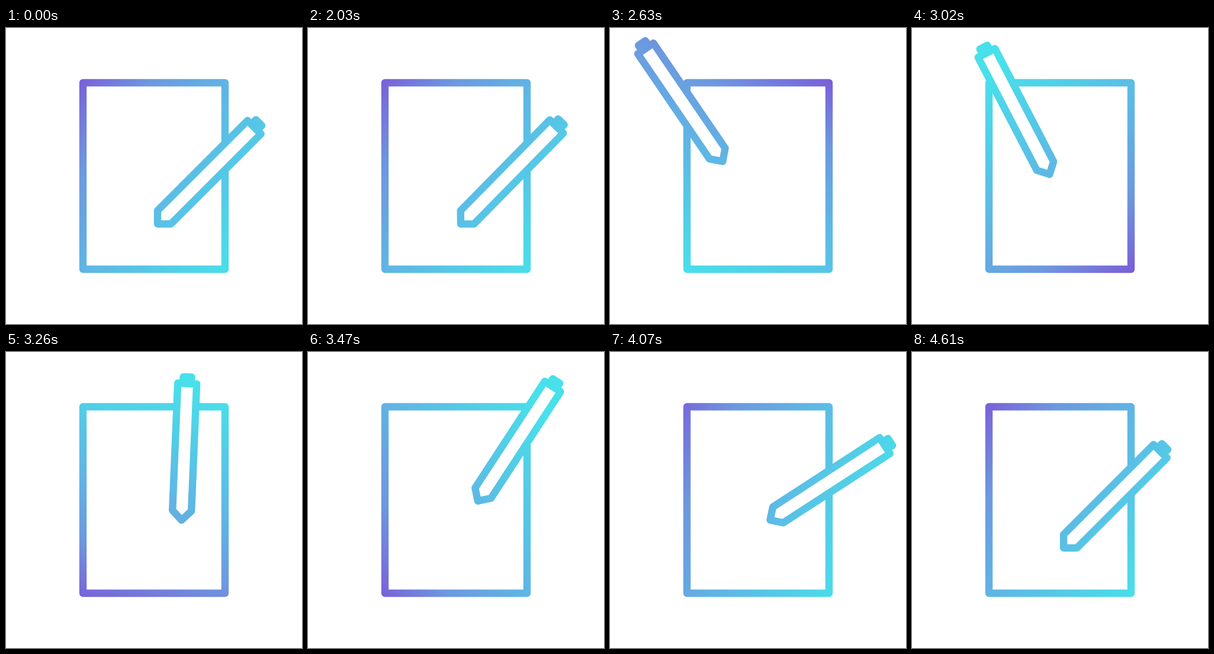
These frames come from a looping animation (500 px wide and 500 px high, 4640 ms). An HTML page with a canvas:

```html
<!DOCTYPE html>
<html lang="en">
<head>
<meta charset="utf-8">
<title>Pen and paper</title>
<style>
html, body { margin: 0; height: 100%; overflow: hidden; background: #fff; }
canvas { display: block; }
</style>
</head>
<body>
<canvas id="stage" width="500" height="500"></canvas>
<script>
const ctx = document.getElementById('stage').getContext('2d');
const LOOP = 4640, START = 2000, LENGTH = 2600;

// The pen rests at each key; the handles bend its path to the next one
const rest = { x: 341.6, y: 245.4, angle: 45 };
const keys = [
  { time: 2000, ...rest, out: [411, 215], into: [165, 130] },
  { time: 2690, x: 119, y: 125, angle: 126, out: [119, 125], into: [124, 119] },
  { time: 2843, x: 124, y: 119, angle: 126, out: [338, 213], into: [373, 123] },
  { time: 3815, x: 351.3, y: 155, angle: 29, out: [400, 265], into: [353, 263] },
  { time: 4600, ...rest }
];

const clamp = x => Math.min(1, Math.max(0, x));
const smooth = s => s * s * (3 - 2 * s);
const radians = degrees => degrees * Math.PI / 180;

function bezier(a, b, c, d, s) {
  const r = 1 - s;
  return a * r ** 3 + 3 * b * r * r * s + 3 * c * r * s * s + d * s ** 3;
}

function poseAt(t) {
  let i = 0;
  while (i < keys.length - 2 && t > keys[i + 1].time) i++;
  const a = keys[i], b = keys[i + 1];
  const s = smooth(clamp((t - a.time) / (b.time - a.time)));
  return {
    x: bezier(a.x, a.out[0], a.into[0], b.x, s),
    y: bezier(a.y, a.out[1], a.into[1], b.y, s),
    angle: a.angle + (b.angle - a.angle) * s
  };
}

// cubic-bezier(1/3, 0, 1/3, 1)
function ease(x) {
  let lo = 0, hi = 1;
  for (let n = 0; n < 30; n++) {
    const s = (lo + hi) / 2;
    if (s - s * s + s ** 3 < x) lo = s; else hi = s;
  }
  return smooth(lo);
}

// One full turn around the middle of the page
function gradientAt(t) {
  const angle = radians(38 + 360 * ease(clamp((t - START) / LENGTH)));
  const dx = 205 * Math.cos(angle), dy = 205 * Math.sin(angle);
  const gradient = ctx.createLinearGradient(250 - dx, 250 - dy, 250 + dx, 250 + dy);
  gradient.addColorStop(0, '#7a5cd8');
  gradient.addColorStop(0.25, '#6d98df');
  gradient.addColorStop(0.5, '#60b4e4');
  gradient.addColorStop(1, '#48e0ea');
  return gradient;
}

function shape(points, { x, y, angle }, fill) {
  ctx.save();
  ctx.translate(x, y);
  ctx.rotate(radians(90 - angle));
  ctx.beginPath();
  points.forEach(p => ctx.lineTo(...p));
  ctx.closePath();
  ctx.restore();
  ctx.fillStyle = fill;
  ctx.fill();
  ctx.stroke();
}

const box = (w, top, bottom) => [[-w, top], [w, top], [w, bottom], [-w, bottom]];
const paper = box(120, -157.5, 157.5);
const body = [[-16, -110], [16, -110], [16, 105], [0, 121], [-16, 105]];
const cap = box(7, -121, -110);

function draw(t) {
  const pose = poseAt(t), gradient = gradientAt(t);
  ctx.clearRect(0, 0, 500, 500);
  ctx.lineWidth = 12.4;
  ctx.lineJoin = 'round';
  ctx.strokeStyle = gradient;
  shape(paper, { x: 250, y: 250, angle: 90 }, '#fff');
  shape(body, pose, '#fff');
  shape(cap, pose, gradient);
}

const begin = performance.now();
function tick() {
  draw((performance.now() - begin) % LOOP);
  requestAnimationFrame(tick);
}
tick();
</script>
</body>
</html>
```
